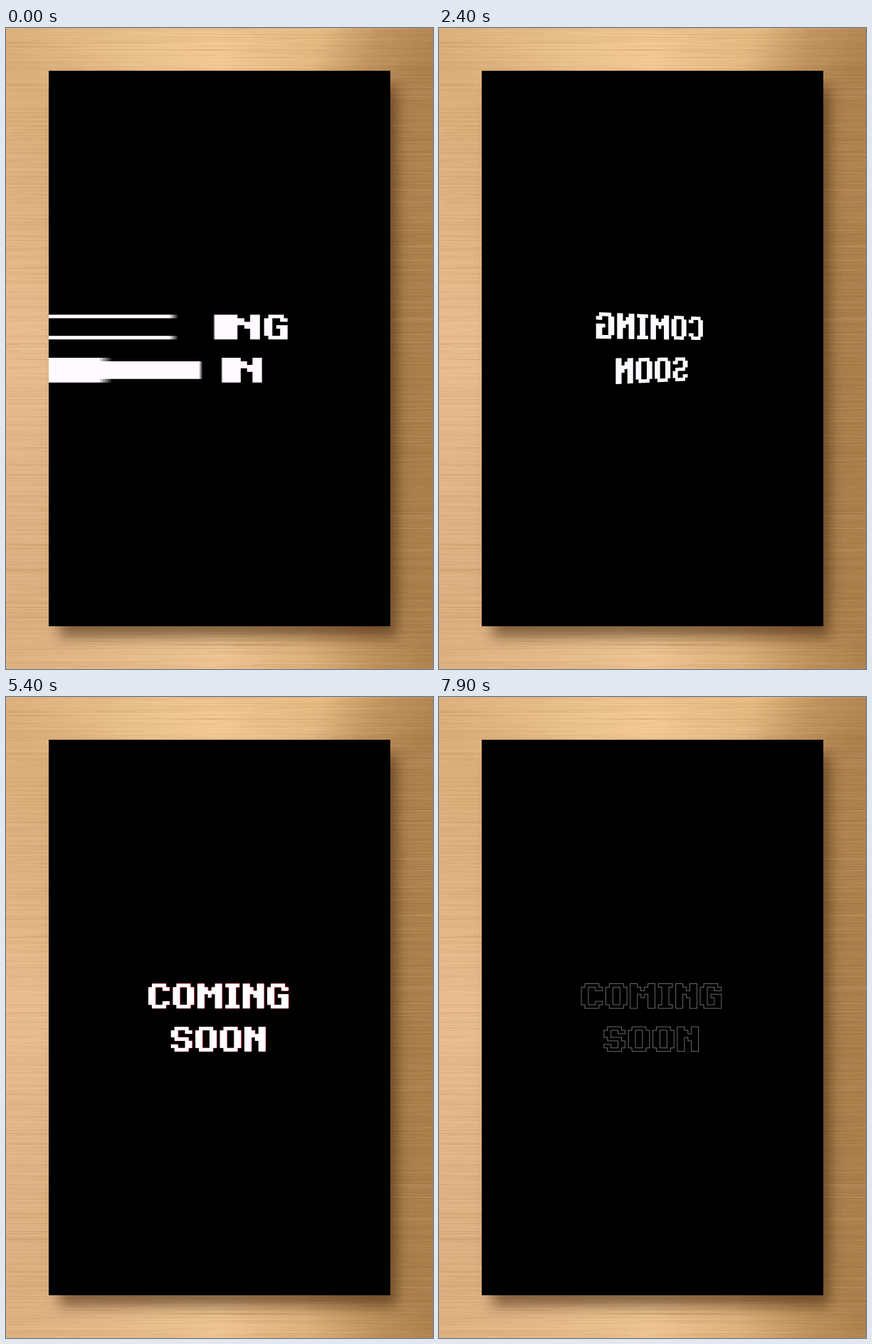
Animation of 600 by 900 pixels, one loop 8000 ms. Source, as an HTML page with a canvas:

```html
<!DOCTYPE html>
<html lang="en">
<head>
<meta charset="utf-8">
<title>Coming soon</title>
<style>
html, body { margin: 0; width: 100%; height: 100%; overflow: hidden; }
body { position: relative; background: #e3b883; }
canvas { position: absolute; left: 0; top: 0; }
#panel {
  position: absolute; left: 60px; top: 60px; width: 480px; height: 780px;
  background: #000; box-shadow: 12px 18px 18px -3px rgba(60, 32, 10, .58);
}
</style>
</head>
<body>
<canvas id="metal" width="600" height="900"></canvas>
<div id="panel"></div>
<canvas id="stage" width="600" height="900" role="img" aria-label="COMING SOON"></canvas>
<script>
const LOOP = 8000, STEP = 100, PX = 4.95, GAP = 4.7;
const GLYPHS = {
  C: '.####. ##..## ##.... ##.... ##.... ##..## .####.',
  O: '.####. ##..## ##..## ##..## ##..## ##..## .####.',
  M: '##...## ###.### ####### ##.#.## ##...## ##...## ##...##',
  I: '#### .##. .##. .##. .##. .##. ####',
  N: '##..## ###.## ###### ##.### ##..## ##..## ##..##',
  G: '.####. ##..## ##.... ##.### ##..## ##..## .#####',
  S: '.####. ##..## ##.... .####. ....## ##..## .####.'
};
const clamp = v => Math.max(0, Math.min(1, v));
const ramp = (t, a, b) => clamp((t - a) / (b - a));

// Brushed metal, lit around the centre
function drawMetal() {
  const m = document.getElementById('metal').getContext('2d');
  const g = m.createConicGradient(-Math.PI / 2, 300, 450);
  [[0, '#f2c893'], [.05, '#e4b981'], [.075, '#c2955f'], [.1, '#ae824f'],
   [.25, '#a97e4b'], [.4, '#a97e4b'], [.425, '#bd905b'], [.455, '#dcb07b'],
   [.5, '#edc391'], [.6, '#dcb081'], [.75, '#e8bd90'], [.9, '#dbae7a'],
   [.95, '#e9c08b'], [1, '#f2c893']].forEach(s => g.addColorStop(...s));
  m.fillStyle = g;
  m.fillRect(0, 0, 600, 900);
  let seed = 7;
  const rnd = () => (seed = seed * 16807 % 2147483647) / 2147483647;
  for (let i = 0; i < 4200; i++) {
    m.fillStyle = rnd() < .5 ? 'rgba(255,222,175,.06)' : 'rgba(120,75,30,.06)';
    m.fillRect(rnd() * 760 - 160, Math.floor(rnd() * 900), 40 + rnd() * 240, 1);
  }
}

// Glyph cells and their outer edges
const cells = [], edges = [];
function layout(word, x, y) {
  for (const ch of word) {
    const rows = GLYPHS[ch].split(' ');
    const on = (r, c) => rows[r] && rows[r][c] === '#';
    rows.forEach((row, r) => [...row].forEach((v, c) => {
      if (v !== '#') return;
      const l = x + c * PX, t = y + r * PX, q = l + PX, b = t + PX;
      cells.push([l, t, q, b]);
      if (!on(r - 1, c)) edges.push([l, t, q, t]);
      if (!on(r + 1, c)) edges.push([l, b, q, b]);
      if (!on(r, c - 1)) edges.push([l, t, l, b]);
      if (!on(r, c + 1)) edges.push([q, t, q, b]);
    }));
    x += rows[0].length * PX + GAP;
  }
}
layout('COMING', 200, 402.5);
layout('SOON', 231.7, 463);

// Smear everything left of the front towards the left
function smear(x, y, front) {
  const k = 22;
  const source = v => {
    const u = (front - v) / k;
    return v + .975 * k * (u > 30 ? u : Math.log(1 + Math.exp(u)));
  };
  let lo = -9000, hi = 700;
  for (let i = 0; i < 26; i++) {
    const mid = (lo + hi) / 2;
    if (source(mid) < x) lo = mid; else hi = mid;
  }
  return [lo, y];
}

function spin(x, y, angle) {
  const w = x - 300, s = 870 / (870 - w * Math.sin(angle));
  return [300 + w * Math.cos(angle) * s, 450 + (y - 450) * s];
}

// Drag the lower right corner away
function drag(x, y, amount) {
  const u = Math.max(0, x - 330 + y - 437);
  const pull = .0175 * u ** 2 + 3.2e-6 * u ** 4;
  const low = clamp((y - 445) / 20);
  return [x + amount * (pull - 18 * low * clamp((340 - x) / 60)),
          y + amount * (.56 * pull + 14 * low)];
}

function mapAt(t) {
  if (t < 400) {
    const front = 330 * (1 - t / 400) ** 2;
    return (x, y) => smear(x, y, front);
  }
  if (t > 410 && t < 3660) {
    const angle = -2 * Math.PI * (t - 410) / 3250;
    return (x, y) => spin(x, y, angle);
  }
  if (t >= 7300 && t < 7800) {
    const amount = (1 - (t - 7300) / 500) ** 2;
    return (x, y) => drag(x, y, amount);
  }
  return (x, y) => [x, y];
}

const ctx = document.getElementById('stage').getContext('2d');

function line(path, map, x1, y1, x2, y2, move) {
  for (let i = move ? 0 : 1; i <= 3; i++) {
    const p = map(x1 + (x2 - x1) * i / 3, y1 + (y2 - y1) * i / 3);
    if (move && !i) path.moveTo(...p); else path.lineTo(...p);
  }
}

function bodyPath(map) {
  const path = new Path2D();
  for (const [l, a, r, b] of cells) {
    line(path, map, l, a, r, a, true);
    line(path, map, r, a, r, b);
    line(path, map, r, b, l, b);
    line(path, map, l, b, l, a);
    path.closePath();
  }
  return path;
}

function paint(draw, dx, color, alpha) {
  ctx.save();
  ctx.translate(dx, 0);
  ctx.globalAlpha = alpha;
  ctx.fillStyle = ctx.strokeStyle = color;
  draw();
  ctx.restore();
}

function render(t) {
  const map = mapAt(t);
  const fill = Math.max(1 - ramp(t, 3800, 4200),
    Math.min(ramp(t, 4700, 5100), 1 - ramp(t, 6300, 6800)));
  ctx.clearRect(0, 0, 600, 900);
  ctx.save();
  ctx.beginPath();
  ctx.rect(60, 315, 480, 270);
  ctx.clip();
  ctx.globalCompositeOperation = 'lighter';
  if (t < 400) {
    // shifted layers soften the stretched ends
    const layers = 5;
    for (let i = 0; i < layers; i++) {
      const body = bodyPath((x, y) => map(x + (i - 2) * .1, y));
      paint(() => ctx.fill(body), 0, '#fdfaff', 1 / layers);
    }
  } else if (fill > 0) {
    const body = bodyPath(map);
    if (t > 4200) paint(() => ctx.fill(body), .7, '#f02030', fill);
    paint(() => ctx.fill(body), 0, '#fdfaff', fill);
  }
  if (fill < 1) {
    const outline = new Path2D();
    for (const e of edges) line(outline, map, ...e, true);
    const warped = t >= 7300 && t < 7800;
    const alpha = (1 - fill) * (warped ? .6 : .45);
    ctx.lineWidth = .9;
    paint(() => ctx.stroke(outline), warped ? .3 : .1, '#f00', alpha);
    paint(() => ctx.stroke(outline), warped ? -.1 : 0, '#0ff', alpha);
  }
  ctx.restore();
}

function tick() {
  const t = performance.now() % LOOP;
  render(Math.floor(t / STEP) * STEP);
  requestAnimationFrame(tick);
}
drawMetal();
tick();
</script>
</body>
</html>
```
